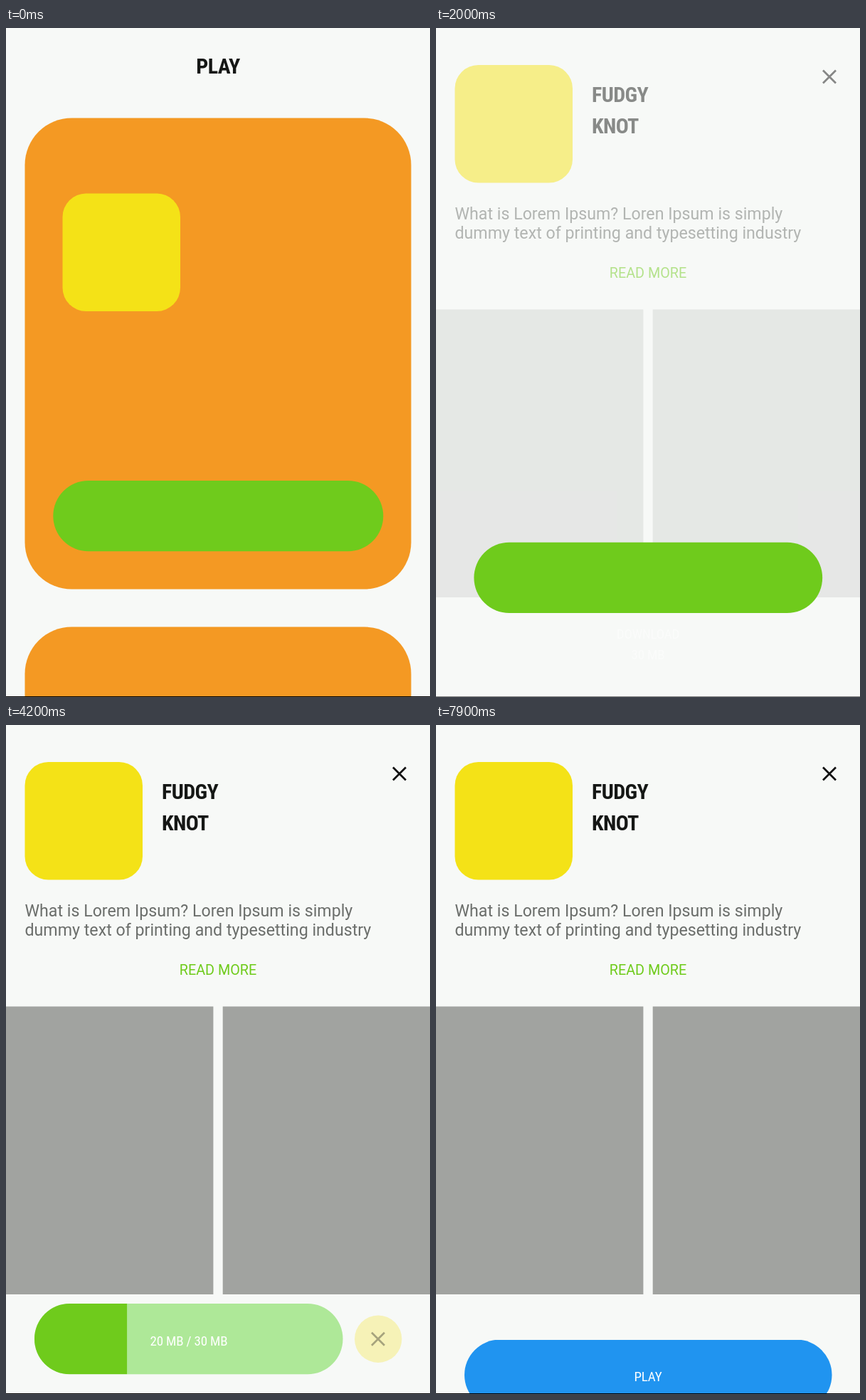
These frames come from a looping animation (596 px wide and 940 px high, 8000 ms). An HTML page:

```html
<!DOCTYPE html>
<html lang="en">
<head>
<meta charset="utf-8">
<title>Game download</title>
<style>
  html, body { margin: 0; width: 100%; height: 100%; overflow: hidden; background: #f7f9f7; }
  svg { display: block; width: 596px; height: 940px; }

  .orange { fill: #f49923; }
  .yellow { fill: #f4e217; }
  .green { fill: #6fcb1c; }
  .blue { fill: #2094f0; }
  .gray { fill: #a1a3a0; }
  .cross { stroke: #111; stroke-width: 2.7; fill: none; }

  .title, .label { font-family: Oswald, "Roboto Condensed", "Open Sans Condensed", Roboto, sans-serif; font-stretch: 75%; }
  .title { font-size: 30px; font-weight: 700; letter-spacing: -.6px; fill: #151715; }
  .label { font-size: 19px; fill: #fff; letter-spacing: -.2px; }
  .body { font: 23.2px Roboto, sans-serif; fill: #6b6e6b; }
  .more { font: 19.8px Roboto, sans-serif; fill: #6fcb1c; }
  .mid { text-anchor: middle; }

  .leave, .enter, .shots, .button, .fill, .ask, .count, .stop, .stop-cross, .bar, .play {
    animation: 8s linear infinite;
  }
  .leave { animation-name: leave; }
  .enter { animation-name: enter; }
  .shots { animation-name: shots; }
  .button { animation-name: button; }
  .fill { animation-name: fill; }
  .ask { animation-name: ask; }
  .count { animation-name: count; }
  .stop { animation-name: stop; }
  .stop-cross { animation-name: stop-cross; }
  .bar { animation-name: bar; }
  .play { animation-name: play; }

  @keyframes leave { 0%, 22.5% { opacity: 1; } 23.75% { opacity: .335; } 24.375%, 100% { opacity: 0; } }
  @keyframes enter {
    0% { opacity: 0; }
    22.5% { opacity: 0; animation-timing-function: ease-out; }
    30%, 100% { opacity: 1; }
  }
  @keyframes shots { 0%, 23.75% { opacity: 0; } 30%, 100% { opacity: 1; } }
  @keyframes button {
    0% { x: 66.3px; y: 636px; width: 464px; fill: #6fcb1c; }
    22.5% { x: 66.3px; y: 636px; width: 464px; fill: #6fcb1c; animation-timing-function: ease-out; }
    30% { x: 40px; y: 813px; width: 516.5px; fill: #6fcb1c; }
    43.125% { x: 40px; y: 813px; width: 516.5px; fill: #6fcb1c; animation-timing-function: ease-out; }
    50.625%, 100% { x: 40px; y: 813px; width: 433.5px; fill: #aee898; }
  }
  @keyframes fill {
    0%, 43.12% { width: 67.5px; opacity: 0; }
    43.125% { width: 67.5px; opacity: 1; }
    92.5%, 100% { width: 396.7px; opacity: 1; }
  }
  @keyframes ask { 0%, 43.125% { opacity: 1; } 46.875%, 100% { opacity: 0; } }
  @keyframes count { 0%, 47.5% { opacity: 0; } 52.5%, 100% { opacity: 1; } }
  @keyframes stop { 0%, 51.25% { opacity: 0; } 52.5% { opacity: .28; } 56.25%, 100% { opacity: 1; } }
  @keyframes stop-cross { 0%, 51.25% { opacity: 0; } 52.5% { opacity: .35; } 55%, 100% { opacity: 0; } }
  @keyframes bar {
    0% { transform: translateY(0); }
    92.5% { transform: translateY(0); animation-timing-function: ease-in; }
    96.25%, 100% { transform: translateY(130px); }
  }
  @keyframes play { 0%, 96.25% { transform: translateY(127px); } 98.75% { transform: translateY(51px); } 100% { transform: translateY(13px); } }
</style>
</head>
<body>
<svg viewBox="0 0 596 940">
  <defs>
    <clipPath id="track"><rect x="40" y="813" width="433.5" height="99.3" rx="49.6"/></clipPath>
    <path id="cross" d="M-9 -9L9 9M9 -9L-9 9"/>
  </defs>
  <rect width="596" height="940" fill="#f7f9f7"/>

  <g class="leave">
    <text class="title mid" x="298" y="64">PLAY</text>
    <rect class="orange" x="26.5" y="126.5" width="543" height="662" rx="66"/>
    <rect class="orange" x="26.5" y="841.5" width="543" height="662" rx="66"/>
    <rect class="yellow" x="79.5" y="232.5" width="165.5" height="165.5" rx="33"/>
    <rect y="939" width="596" height="1"/>
  </g>

  <g class="enter">
    <rect class="yellow" x="26.5" y="52" width="165.5" height="165.5" rx="33"/>
    <text class="title" x="219" y="104">FUDGY</text>
    <text class="title" x="219" y="148">KNOT</text>
    <use class="cross" href="#cross" x="553" y="68.5"/>
    <text class="body" x="26.5" y="269">What is Lorem Ipsum? Loren Ipsum is simply</text>
    <text class="body" x="26.5" y="296.3">dummy text of printing and typesetting industry</text>
    <text class="more mid" x="298" y="350.5">READ MORE</text>
  </g>

  <g class="shots gray">
    <rect y="395.5" width="291.4" height="404.5"/>
    <rect x="304.7" y="395.5" width="291.3" height="404.5"/>
  </g>

  <g class="bar">
    <rect class="button" height="99.3" rx="49.6"/>
    <g clip-path="url(#track)"><rect class="fill green" x="40" y="813" height="99.3"/></g>
    <g class="enter">
      <g class="ask">
        <text class="label mid" x="298" y="857.5">DOWNLOAD</text>
        <text class="label mid" x="298" y="887">30 MB</text>
      </g>
    </g>
    <text class="label mid count" x="257" y="871.5">20 MB / 30 MB</text>
    <circle class="yellow stop" cx="523.2" cy="862.7" r="33.2"/>
    <g class="stop-cross"><use class="cross" href="#cross" x="523" y="862.7"/></g>
  </g>

  <g class="play">
    <rect class="blue" x="40" y="813" width="516.5" height="99.3" rx="49.6"/>
    <text class="label mid" x="298" y="871.5">PLAY</text>
  </g>

  <rect class="enter" y="939" width="596" height="1"/>
</svg>
</body>
</html>
```
